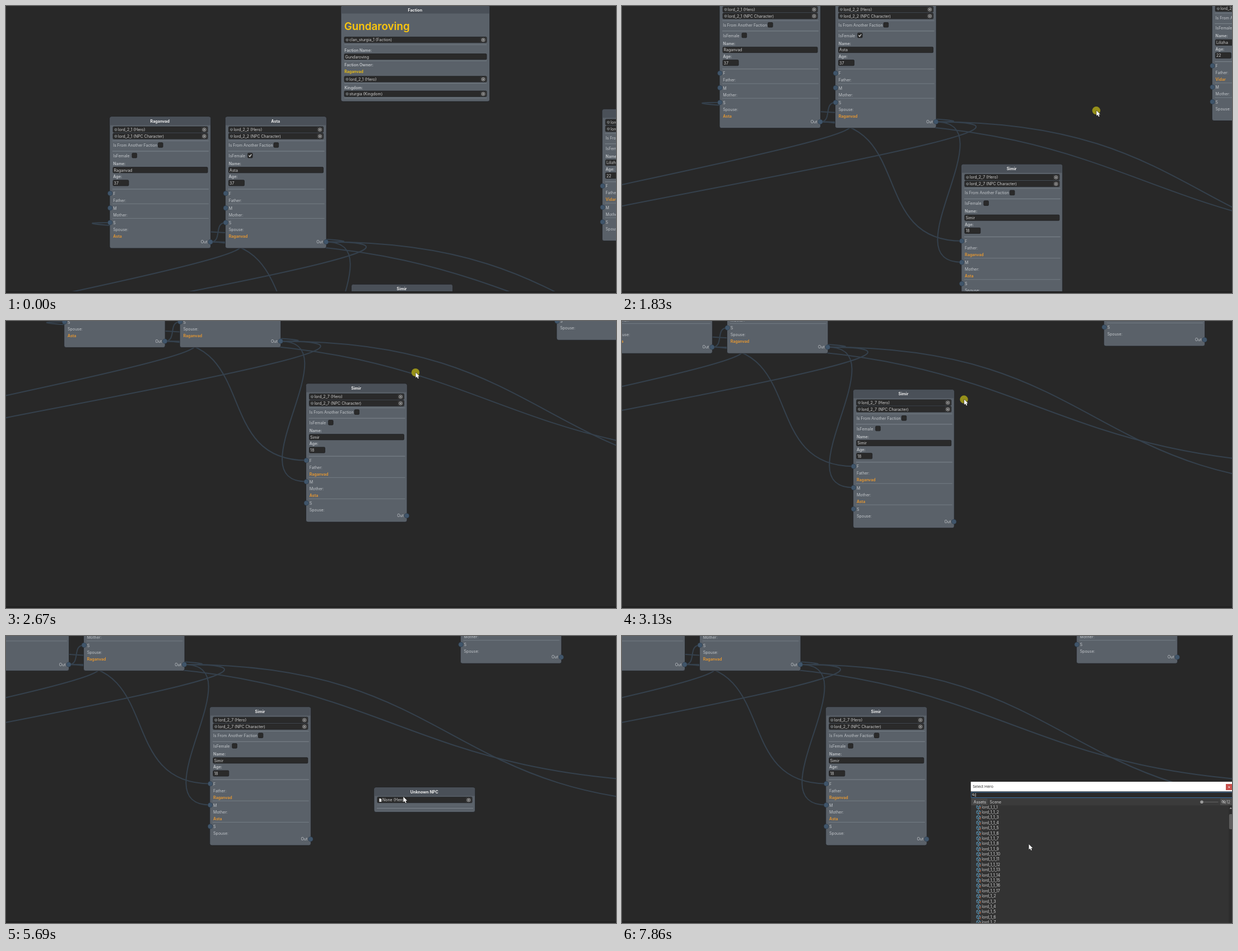
Recreate the animation shown at these times as an HTML page with a canvas. Size 1089 by 514 pixels, loop 8 s.

```html
<!DOCTYPE html>
<html lang="en">
<head>
<meta charset="utf-8">
<title>Family graph editor</title>
<style>
html, body { margin: 0; width: 100%; height: 100%; overflow: hidden; background: #282828; }
canvas { display: block; width: 1089px; height: 514px; }
</style>
</head>
<body>
<canvas id="stage"></canvas>
<script>
const W = 1089, H = 514, LOOP = 8000, STEP = 76.2;
const canvas = document.getElementById('stage');
const ctx = canvas.getContext('2d');
const dpr = window.devicePixelRatio || 1;
canvas.width = W * dpr;
canvas.height = H * dpr;

const UI = 'Inter, "Open Sans", sans-serif';
const LABEL = '#c3c7cb', VALUE = '#cfcfcf', GOLD = '#fdc70c', ORANGE = '#eb9a30';
const FIELD = '#2a2a2a', EDGE = '#1f2022', RULE = '#7d858d', DIM = '#737c84', ICON = '#c4c4c4';

// Moves: start time, end time, x and y to reach
const PAN = [[1354, 2245, -20, -391.8], [2250, 3490, -253, -371.5]];
const MOUSE = [
  [20, 520, 778, 449], [680, 980, 863.5, 439.5],
  [1265, 2206, 837.5, 49.5], [2250, 3120, 610.5, 140.5],
  [3650, 4130, 690, 294], [4283, 4480, 653.5, 266.5],
  [4750, 5220, 709, 288], [6000, 6610, 828, 293], [7480, 7720, 726, 373]
];

function ease(t, from, to) {
  const k = Math.min(1, Math.max(0, (t - from) / (to - from)));
  return k * k * (3 - 2 * k);
}

function travel(x, y, moves, t) {
  for (const [from, to, tx, ty] of moves) {
    const k = ease(t, from, to);
    x += (tx - x) * k;
    y += (ty - y) * k;
  }
  return [x, y];
}

// y is the middle of the capitals
function text(s, x, y, color = LABEL, { size = 7, weight = 400, align = 'left', family = UI } = {}) {
  ctx.font = `${weight} ${size}px ${family}`;
  ctx.textAlign = align;
  ctx.fillStyle = color;
  ctx.fillText(s, x, y + size * 0.36);
}

const bold = (s, x, y, color = LABEL) => text(s, x, y, color, { weight: 600 });

function rect(x, y, w, h, color) {
  ctx.fillStyle = color;
  ctx.fillRect(x, y, w, h);
}

function stroke(color, width) {
  ctx.strokeStyle = color;
  ctx.lineWidth = width;
  ctx.stroke();
}

function box(x, y, w, h, r, fill, edge) {
  ctx.beginPath();
  ctx.roundRect(x, y, w, h, r);
  ctx.fillStyle = fill;
  ctx.fill();
  if (edge) stroke(edge, 0.8);
}

function disc(x, y, r, fill) {
  ctx.beginPath();
  ctx.arc(x, y, r, 0, 7);
  ctx.fillStyle = fill;
  ctx.fill();
}

function ring(x, y, rx, ry = rx) {
  ctx.beginPath();
  ctx.ellipse(x, y, rx, ry, 0, 0, 7);
  stroke(ICON, 0.8);
}

function line(points, color, width = 0.8) {
  ctx.beginPath();
  points.forEach(p => ctx.lineTo(...p));
  stroke(color, width);
}

function shape(points, fill) {
  ctx.beginPath();
  points.forEach(p => ctx.lineTo(...p));
  ctx.closePath();
  ctx.fillStyle = fill;
  ctx.fill();
}

function cube(x, y, r, color) {
  const p = a => [x + r * Math.sin(a * Math.PI / 3), y - r * Math.cos(a * Math.PI / 3)];
  line([0, 1, 2, 3, 4, 5, 6].map(p), color);
  line([p(5), [x, y], p(1)], color);
  line([[x, y], p(3)], color);
}

const rule = (x, y, w, color = RULE) => rect(x, y - 0.5, w, 1, color);

function field(x, y, w, value = '') {
  box(x, y - 5.4, w, 10.2, 1.5, FIELD, EDGE);
  text(value, x + 1.6, y, VALUE);
}

function pickButton(x, y) {
  rect(x - 5, y - 4.5, 10.5, 8.6, '#373737');
  ring(x, y, 2.9);
  disc(x, y, 1.2, ICON);
}

function objectField(s, x, y, w) {
  field(x, y, w);
  cube(x + 5, y, 2.3, '#85898c');
  text(s, x + 9, y, VALUE);
  pickButton(x + w - 6, y);
}

function checkbox(x, y, on) {
  box(x, y - 4.3, 8.6, 8.6, 1.5, FIELD, EDGE);
  if (on) line([[x + 2, y], [x + 3.7, y + 2], [x + 6.7, y - 2]], '#e6e6e6', 1.2);
}

function panel(x, y, w, h, title, bar = 15) {
  box(x, y, w, h, 3.5, '#5a6169', '#202327');
  box(x + 0.4, y + 0.4, w - 0.8, bar, [3, 3, 0, 0], '#4a5058');
  text(title, x + w / 2 - 0.5, y + 8, '#eeeeee', { size: 7.1, weight: 700, align: 'center' });
}

function port(x, y) {
  disc(x, y, 4.5, '#2f3e4d');
  disc(x, y, 3.8, '#40556a');
}

function person({ x, y, name, id, age, female, father, mother, spouse }) {
  const left = x + 6.3;
  const links = [['Father:', father], ['Mother:', mother], ['Spouse:', spouse]];
  const named = links.filter(([, who]) => who).length;
  panel(x, y, 180.5, 223.9 + 12 * named, name);
  objectField(id + ' (Hero)', x + 6, y + 23.5, 169);
  objectField(id + ' (NPC Character)', x + 6, y + 35.3, 169);
  rule(x + 5, y + 43.4, 172, DIM);
  text('Is From Another Faction', left, y + 51.4);
  checkbox(x + 86.5, y + 51, false);
  rule(x + 5, y + 62, 172);
  text('IsFemale', left, y + 70.2);
  checkbox(x + 40, y + 69.7, female);
  bold('Name:', left, y + 84.3);
  field(x + 6, y + 96, 169, name);
  bold('Age:', left, y + 107.7);
  field(x + 6, y + 119.2, 28, age);
  rule(x + 5, y + 130, 172);

  let row = y + 137.5;
  links.forEach(([label, who], i) => {
    port(x + 0.8, row);
    text(label[0], left, row + 0.6);
    row += 12;
    text(label, left, row + 0.6);
    if (who) {
      row += 12;
      bold(who, left, row + 0.6, ORANGE);
    }
    if (i < 2) {
      rule(x + 5, row + 6.7, 172, DIM);
      row += 14.2;
    }
  });
  text('Out', x + 174.5, row + 10.7, LABEL, { align: 'right' });
  port(x + 180, row + 10.7);
}

function faction() {
  const x = 598, left = 604.3, w = 254;
  panel(x, -1, 265.5, 172, 'Faction', 14);
  text('Gundaroving', left - 0.5, 36, GOLD, { size: 18.8, weight: 600 });
  objectField('clan_sturgia_1 (Faction)', x + 6, 60.8, w);
  bold('Faction Name:', left, 79.2);
  field(x + 6, 91, w, 'Gundaroving');
  bold('Faction Owner:', left, 105.6);
  bold('Raganvad', left, 117.5, '#f3c30f');
  objectField('lord_2_1 (Hero)', x + 6, 131.2, w);
  bold('Kingdom:', left, 146.2);
  objectField('sturgia (Kingdom)', x + 6, 157.5, w);
  for (const y of [69.2, 98.2, 138.5, 164.8]) rule(x + 6, y, w, DIM);
}

const PEOPLE = [
  { x: 185, y: 198, name: 'Raganvad', id: 'lord_2_1', age: '37', spouse: 'Asta' },
  { x: 391.5, y: 198, name: 'Asta', id: 'lord_2_2', age: '37', female: true, spouse: 'Raganvad' },
  { x: 1064.3, y: 184.8, name: 'Lilizha', id: 'lord_2_9', age: '22', female: true, father: 'Vidar' },
  { x: 616.8, y: 498.6, name: 'Simir', id: 'lord_2_7', age: '18', father: 'Raganvad', mother: 'Asta' }
];

const DAD = [365, 422.6], MUM = [571.5, 422.6];
const CHILDREN = [[-261, 630], [617.5, 636], [1525, 635]];

// Tangents are half the distance between the two ports
function wire([ax, ay], [bx, by]) {
  const pull = Math.hypot(bx - ax, by - ay) / 2;
  ctx.beginPath();
  ctx.moveTo(ax, ay);
  ctx.bezierCurveTo(ax + pull, ay, bx - pull, by, bx, by);
  stroke('#35414d', 2);
}

function wires() {
  wire(MUM, [185.5, 388]);
  wire(DAD, [392, 388]);
  for (const [x, y] of CHILDREN) {
    wire(DAD, [x, y]);
    wire(MUM, [x, y + 38]);
  }
}

function newNode() {
  panel(657, 271, 180.5, 44.5, 'Unknown NPC');
  field(663, 293.8, 169);
  shape([[666.3, 291], [668.8, 291], [670.3, 292.6], [670.3, 297], [666.3, 297]], '#e4e4e4');
  text('None (Hero)', 672, 293.8, VALUE);
  pickButton(826, 293.8);
  rule(662, 303, 172, '#636b73');
  rule(662, 308.5, 172);
}

const MENU = ['Create Faction', 'Create NPC', 'Create Kingdom', 'Preferences'];

function menu(my) {
  box(653.5, 266.5, 110.5, 59, 0, '#f2f2f2', '#a0a0a0');
  MENU.forEach((s, i) => {
    const y = 268 + i * 14;
    if (my >= y && my < y + 14) rect(655, y, 107.5, 14, '#91c9f7');
    text(s, 668, y + 7, '#1a1a1a');
  });
}

const ITEMS = ['None', 'lord_1', 'lord_1_1'];
for (let i = 1; i <= 17; i++) ITEMS.push('lord_1_1_' + i);
for (let i = 2; i <= 14; i++) ITEMS.push('lord_1_' + i);

function list(scroll) {
  ctx.save();
  ctx.beginPath();
  ctx.rect(622, 303.5, 461, 211);
  ctx.clip();
  ITEMS.forEach((s, i) => {
    const y = 309.9 + i * 9.39 - scroll;
    if (i) {
      cube(636.3, y - 0.1, 3.7, '#67b4de');
      line([[638.3, y + 0.6], [640.2, y + 0.6], [638.6, y + 2.2], [640.4, y + 3.6]], '#d9683b', 1);
    }
    text(s, 642.3, y, '#d0d0d0');
  });
  ctx.restore();

  rect(1083, 303.5, 6, 211, '#2d2d2d');
  shape([[1084.5, 309.5], [1086.8, 306.8], [1089, 309.5]], '#a0a0a0');
  box(1083.8, 312 + scroll * 0.22, 8, 27, 2, '#5f5f5f');
}

function picker(scroll) {
  rect(622, 261, 467, 253, '#333333');
  rect(622, 261, 467, 17.5, '#ffffff');
  text('Select Hero', 626.3, 270, '#222222', { size: 6.9, family: '"Open Sans", "Noto Sans", sans-serif' });
  rect(1078, 265, 11, 11, '#c8504c');
  for (const d of [-1.5, 1.5]) line([[1083.8 - d, 269.2], [1083.8 + d, 272.2]], '#fff', 0.9);

  rect(622, 278.5, 467, 25, '#3b3b3b');
  box(623, 279.8, 470, 9.7, 1.5, FIELD, '#3c7fc0');
  ring(627, 284, 1.5);
  line([[628, 285], [629.6, 286.8]], ICON);
  rect(630.7, 281.5, 0.8, 6.5, '#dddddd');

  rect(624, 291, 28.5, 12, '#464646');
  text('Assets', 627.8, 297.2, '#d8d8d8');
  text('Scene', 656.4, 297.2, '#d0d0d0');
  rect(1035, 296.8, 29.5, 1, '#656565');
  disc(1035, 297.2, 2.8, '#9a9a9a');
  rect(1068, 291, 21, 12, '#4b4b4b');
  ring(1074.3, 297, 3.6, 2.1);
  disc(1074.3, 297, 1.1, ICON);
  line([[1070.8, 294], [1077.8, 300.2]], ICON);
  text('12', 1079, 297.2, ICON);

  list(scroll);
  rect(622, 261, 0.7, 253, '#222222');
}

const ARROW = [[0, 0], [0, 9.6], [2.2, 7.6], [3.8, 11], [5.4, 10.3], [3.9, 7], [6.8, 7]];

function pointer(x, y) {
  const points = ARROW.map(([a, b]) => [x + a, y + b]);
  line([...points, points[0]], '#161616', 1);
  shape(points, '#ffffff');
}

function draw(t) {
  const tick = Math.floor((t + 10) / STEP) * STEP;
  const [mx, my] = travel(993, 498, MOUSE, tick);
  const menuOpen = t >= 4590 && t < 5540;
  const pressed = (t >= 1220 && t < 3650) || (t >= 4500 && t < 4660);

  ctx.setTransform(dpr, 0, 0, dpr, 0, 0);
  rect(0, 0, W, H, '#282828');
  ctx.save();
  ctx.translate(...travel(0, 0, PAN, tick));
  wires();
  faction();
  PEOPLE.forEach(person);
  ctx.restore();

  if (t >= 5540) newNode();
  rect(0, 511, W, 3, '#212121');
  if (menuOpen) menu(my);
  if (t >= 6840) picker(32 * ease(tick, 7560, 7840));
  if (pressed) disc(mx, my, 7.2, '#96901a');
  if (t >= 70) pointer(mx + 0.4, my);
}

function loop(now) {
  draw(now % LOOP);
  requestAnimationFrame(loop);
}
requestAnimationFrame(loop);
</script>
</body>
</html>
```
